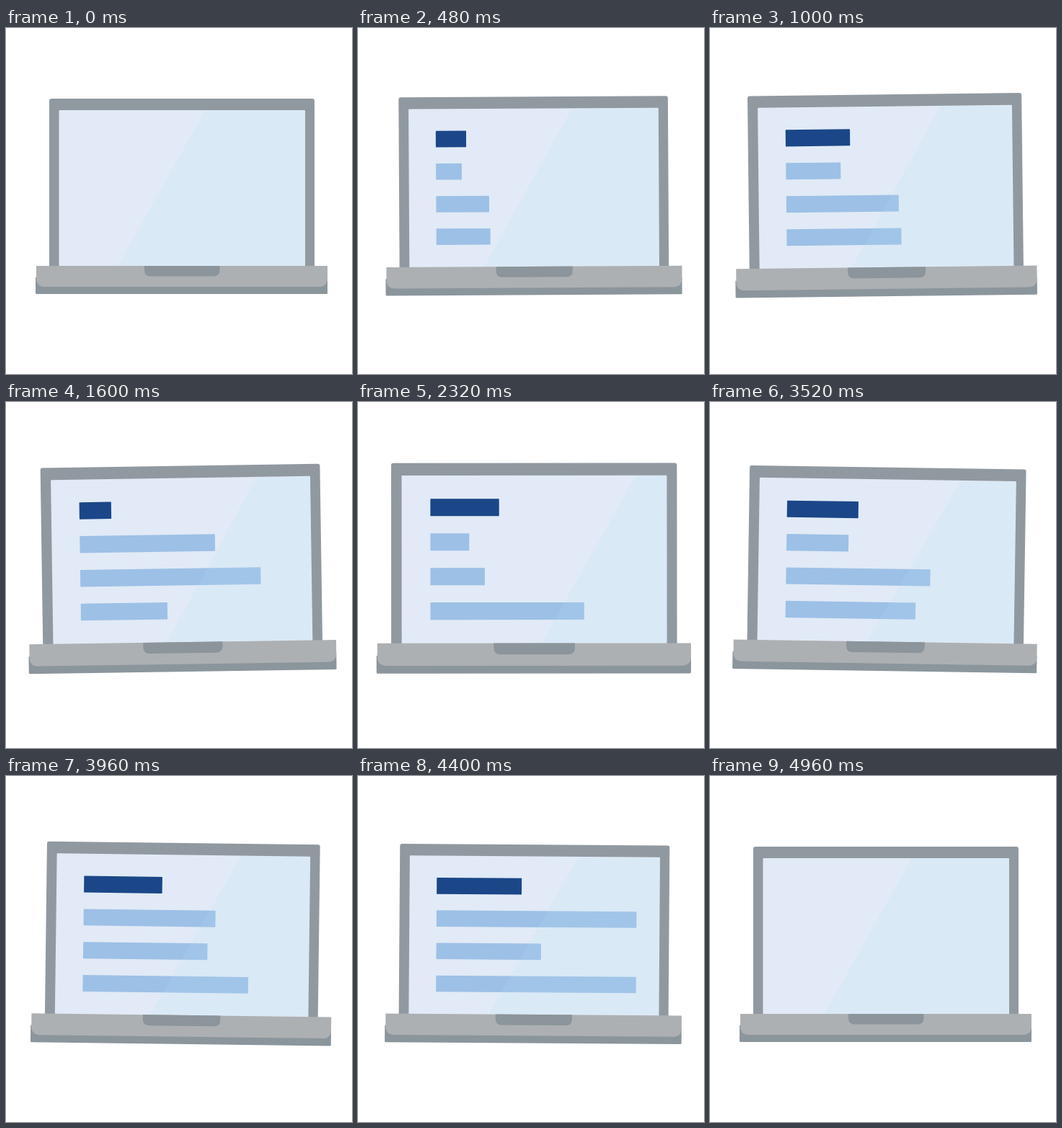
Write an HTML page that moves like this. It is 480 px wide and 480 px high and loops after 5080 ms.

```html
<!DOCTYPE html>
<html lang="en">
<head>
<meta charset="utf-8">
<title>Laptop</title>
<style>
  html, body { margin: 0; width: 100%; height: 100%; overflow: hidden; background: #fff; }
  svg { display: block; width: 100%; height: 100%; }
</style>
</head>
<body>
<svg viewBox="0 0 480 480">
  <clipPath id="screen"><rect x="74" y="114.5" width="340.5" height="215.5"/></clipPath>
  <g id="laptop">
    <path d="M60 331V101q0-3 3-3H425q3 0 3 3V331z" fill="#9199a0"/>
    <rect x="73.5" y="114" width="341.5" height="217" rx="1" fill="#e1eaf6"/>
    <g clip-path="url(#screen)">
      <g id="bars"></g>
      <path id="glare" d="M277 114H800V330H155.5z" fill="rgb(181,221,240)" fill-opacity=".16"/>
    </g>
    <path d="M41 346H446V367.500q0 1.500-1.500 1.500H42.500q-1.500 0-1.500-1.500z" fill="#8b959c"/>
    <path d="M42 330H446V347q0 12-12 12H54q-12 0-12-12z" fill="#adb0b2"/>
    <path d="M192 330H296.500V336q0 8.500-8.500 8.500H200.500q-8.500 0-8.500-8.500z" fill="#8b959b"/>
  </g>
</svg>
<script>
const LOOP = 5080, STEP = 40, LAST = 4960;
const CX = 240, CY = 271;

// Rows of [time, value]
const scale = [[0, 1], [40, 1], [2300, 1.078], [LAST, 1]];
const tilt = [[0, 0], [1480, -0.98], [2360, 0], [3640, 0.95], [LAST, 0]];
const glareX = [[0, 0], [2520, 107], [5040, 0]];

const barTimes = [0, 1000, 1600, 2320, 3520, 4400, LAST];
const barWidths = [
  [0, 86.5, 42, 88.5, 95, 116, 0],
  [0, 73.5, 178, 50, 82.5, 273, 0],
  [0, 151, 237.5, 70, 192, 143, 0],
  [0, 154, 114, 198, 173, 273, 0]
];

const laptop = document.getElementById('laptop');
const glare = document.getElementById('glare');
const barGroup = document.getElementById('bars');

function at(keys, t) {
  let i = 1;
  while (i < keys.length - 1 && t > keys[i][0]) i++;
  const [t0, v0] = keys[i - 1], [t1, v1] = keys[i];
  return v0 + (v1 - v0) * Math.min(1, (t - t0) / (t1 - t0));
}

const bars = barWidths.map((widths, i) => {
  const el = document.createElementNS('http://www.w3.org/2000/svg', 'rect');
  const attrs = { x: 110.5, y: 144 + 44.5 * i, height: 22.3, rx: 0.6, fill: i ? '#9dc0e6' : '#1b4788' };
  for (const name in attrs) el.setAttribute(name, attrs[name]);
  barGroup.append(el);
  return { el, keys: widths.map((w, k) => [barTimes[k], w]) };
});

function draw(now) {
  const t = Math.min(LAST, Math.floor((now % LOOP) / STEP) * STEP);
  laptop.setAttribute('transform',
    `translate(${CX} ${CY}) rotate(${at(tilt, t)}) scale(${at(scale, t)}) translate(${-CX} ${-CY})`);
  glare.setAttribute('transform', `translate(${at(glareX, t)} 0)`);
  for (const { el, keys } of bars) el.setAttribute('width', at(keys, t));
}

const start = performance.now();
function tick() {
  draw(performance.now() - start);
  requestAnimationFrame(tick);
}
tick();
</script>
</body>
</html>
```
